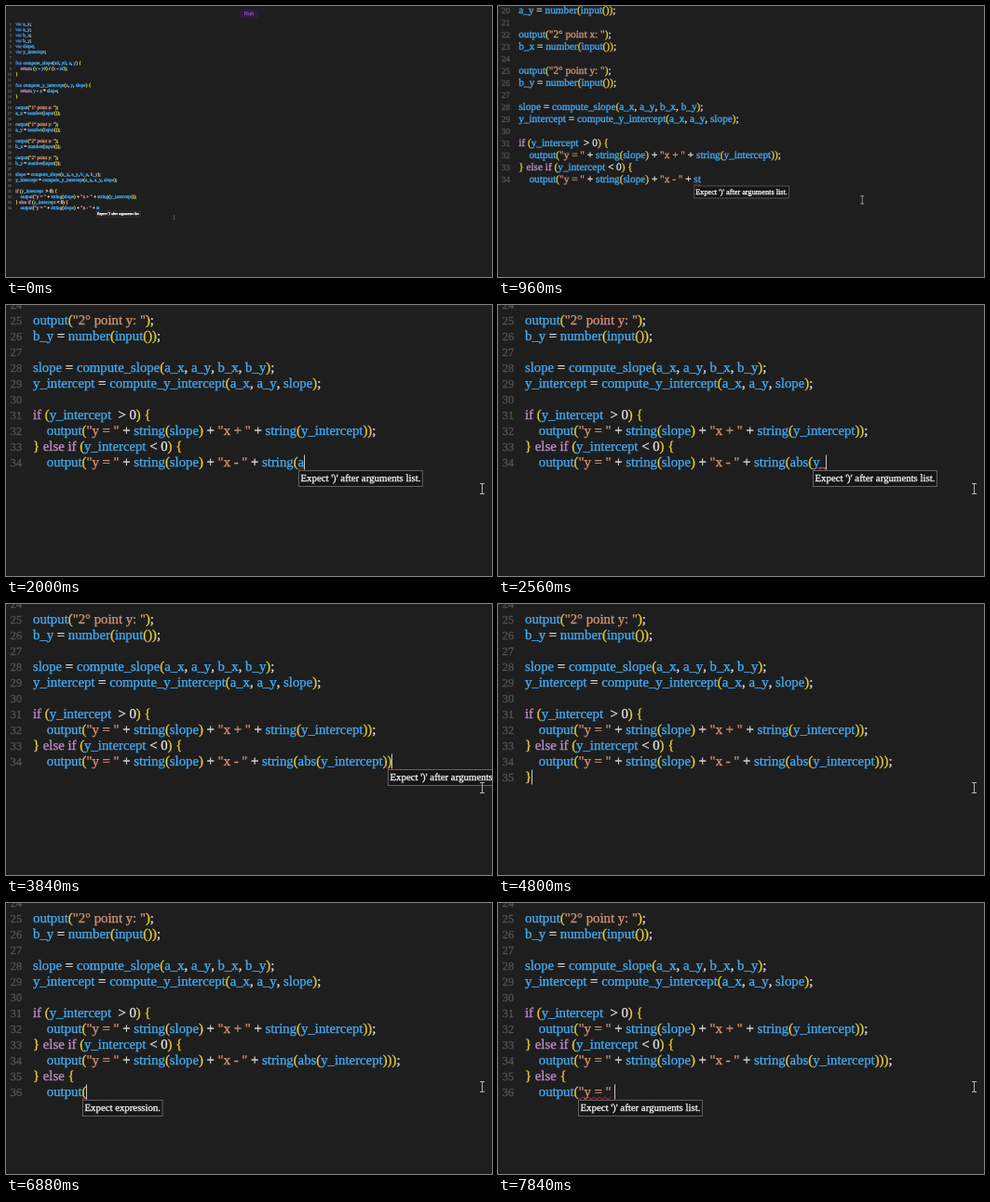
Recreate the animation shown at these times as an HTML page with a canvas. Size 522 by 292 pixels, loop 8 s.

```html
<!DOCTYPE html>
<html lang="en">
<head>
<meta charset="utf-8">
<title>Code editor</title>
<style>
  html, body { margin: 0; width: 100%; height: 100%; overflow: hidden; background: #1e1e1e; }
  canvas { display: block; width: 522px; height: 292px; }
</style>
</head>
<body>
<canvas id="stage"></canvas>
<script>
const W = 522, H = 292, LOOP = 8000, STEP = 80;
const SERIF = '"Liberation Serif", "Times New Roman", serif';
const SIZE = 14.78, PITCH = 17, LEFT = 29;
const WIDE = 6 / 17, FIXED_Y = 244.3;

const COLORS = {
  name: '#45aaf0', decl: '#4387d0', flow: '#c08cc8',
  bracket: '#e6cc3a', string: '#d29272', plain: '#e2e2e2'
};

const BASE = `var a_x;
var a_y;
var b_x;
var b_y;
var slope;
var y_intercept;

fun compute_slope(x0, y0, x, y) {
    return (y - y0) / (x - x0);
}

fun compute_y_intercept(x, y, slope) {
    return y - x * slope;
}

output("1° point x: ");
a_x = number(input());

output("1° point y: ");
a_y = number(input());

output("2° point x: ");
b_x = number(input());

output("2° point y: ");
b_y = number(input());

slope = compute_slope(a_x, a_y, b_x, b_y);
y_intercept = compute_y_intercept(a_x, a_y, slope);

if (y_intercept  > 0) {
    output("y = " + string(slope) + "x + " + string(y_intercept));
} else if (y_intercept < 0) {
    output("y = " + string(slope) + "x - " + st`;

const ARGS = "Expect ')' after arguments list.";
const BLOCK = "Expect '}' after block.";
const SEMI = "Expect ';' after expression.";
const VALUE = 'Expect expression.';
const QUOTE = 'Unterminated string.';

// [time, typed text, new message]; the message stays until replaced
const EDITS = [
  ...keys(1600, 'ring'), [1920, '(', VALUE], [2000, 'a', ARGS], ...keys(2080, 'bs'),
  [2240, '(', VALUE], [2400, 'y', ARGS], [2560, '_'], [2640, 'in'],
  ...keys(2800, 'terce'), [3200, 'pt'],
  [3360, ')'], [3680, ')'], [3920, ')', SEMI], [4240, ';', BLOCK],
  [4640, '\n'], [4800, '}', ''],
  [4960, ' '], [5040, 'e', SEMI], ...keys(5120, 'ls'), [5280, 'e', VALUE],
  [5360, ' '], [5520, '{', BLOCK], [5760, '\n'],
  [6160, '    '], [6240, 'o', SEMI], ...keys(6320, 'utput'),
  [6800, '(', VALUE], [7200, '"', QUOTE], [7520, 'y '], [7600, '= '],
  [7760, '"', ARGS], [7840, ' ']
];

const canvas = document.getElementById('stage');
const ctx = canvas.getContext('2d');
const dpr = window.devicePixelRatio || 1;
canvas.width = W * dpr;
canvas.height = H * dpr;

function keys(start, text) {
  return [...text].map((ch, i) => [start + i * STEP, ch]);
}

function editorAt(t) {
  let text = BASE, message = ARGS;
  for (const [time, typed, note] of EDITS) {
    if (time > t) break;
    text += typed;
    if (note !== undefined) message = note;
  }
  return { lines: text.split('\n'), message };
}

function zoomAt(t) {
  const p = Math.min(1, Math.max(0, (t - 800) / 320));
  return WIDE + (1 - WIDE) * (1 - Math.pow(1 - p, 1.46));
}

const baseline = row => 20.9 + PITCH * (row - 24);
const tokens = line => [...line.matchAll(/"[^"]*"?|\w+|[^\s\w]/g)];

function setFont(size, family = SERIF) {
  ctx.font = `${size}px ${family}`;
  ctx.fontKerning = 'none';
  ctx.textRendering = 'geometricPrecision';
}

// Text with a hairline outline of constant width on screen
function drawText(text, x, y, color) {
  ctx.fillStyle = ctx.strokeStyle = color;
  ctx.lineWidth = 0.32 * dpr / ctx.getTransform().a;
  ctx.fillText(text, x, y);
  ctx.strokeText(text, x, y);
}

function columnX(line, col) {
  setFont(SIZE);
  return LEFT + ctx.measureText(line.slice(0, col)).width;
}

function colorOf(token) {
  if (token[0] === '"') return COLORS.string;
  if (/^(if|else|return)$/.test(token)) return COLORS.flow;
  if (/^(var|fun)$/.test(token)) return COLORS.decl;
  if (/^[a-z_]/.test(token)) return COLORS.name;
  return /[(){}]/.test(token) ? COLORS.bracket : COLORS.plain;
}

function drawLine(line, row) {
  const y = baseline(row);
  setFont(12.2);
  ctx.textAlign = 'right';
  drawText(row + 1, 17, y, '#535353');
  ctx.textAlign = 'left';
  for (const token of tokens(line)) {
    drawText(token[0], columnX(line, token.index), y, colorOf(token[0]));
  }
}

function drawError(lines, message) {
  let row = lines.length - 1;
  while (!lines[row].trim()) row--;
  const line = lines[row], last = tokens(line).pop();
  const x = columnX(line, last.index);
  const end = columnX(line, last.index + last[0].length);
  const y = baseline(row);

  ctx.strokeStyle = '#d83a32';
  ctx.lineWidth = 1;
  ctx.beginPath();
  for (let px = x; px <= end; px += 0.5) {
    ctx.lineTo(px, y + 2.4 + 0.9 * Math.sin((px - x) * Math.PI / 3));
  }
  ctx.stroke();

  setFont(10.8);
  const left = Math.round(x) + 0.5, top = y + 4.6;
  const width = ctx.measureText(message).width + 4;
  ctx.fillStyle = '#161616';
  ctx.fillRect(left, top, width, 17);
  ctx.strokeStyle = '#626262';
  ctx.strokeRect(left, top, width, 17);
  drawText(message, left + 2, top + 11.3, '#f2f2f2');
}

function drawCaret(lines) {
  const row = lines.length - 1;
  const x = columnX(lines[row], lines[row].length);
  ctx.fillStyle = '#c8c8c8';
  ctx.fillRect(Math.floor(x), baseline(row) - 12.4, 1, 16);
}

function drawPointer() {
  ctx.strokeStyle = '#b4b4b4';
  ctx.lineWidth = 1;
  ctx.beginPath();
  for (const y of [192.5, 203.5]) {
    ctx.moveTo(509, y);
    ctx.lineTo(514, y);
  }
  ctx.moveTo(511.5, 192.5);
  ctx.lineTo(511.5, 203.5);
  ctx.stroke();
}

function drawRunButton() {
  ctx.fillStyle = '#301b3b';
  ctx.beginPath();
  ctx.roundRect(711, -439, 57, 29, 4);
  ctx.fill();
  setFont(16, '"Liberation Sans", Arial, sans-serif');
  ctx.textAlign = 'center';
  drawText('Run', 739.5, -419, '#8450a8');
  ctx.textAlign = 'left';
}

function render(t) {
  const { lines, message } = editorAt(t);
  const zoom = zoomAt(t);
  ctx.setTransform(dpr, 0, 0, dpr, 0, 0);
  ctx.fillStyle = '#1e1e1e';
  ctx.fillRect(0, 0, W, H);
  ctx.translate(0, FIXED_Y * (1 - zoom));
  ctx.scale(zoom, zoom);
  drawRunButton();
  lines.forEach(drawLine);
  if (message) drawError(lines, message);
  if (t >= EDITS[0][0]) drawCaret(lines);
  drawPointer();
}

const start = performance.now();
function tick() {
  const t = (performance.now() - start) % LOOP;
  render(Math.floor(t / STEP) * STEP);
  requestAnimationFrame(tick);
}
tick();
</script>
</body>
</html>
```
